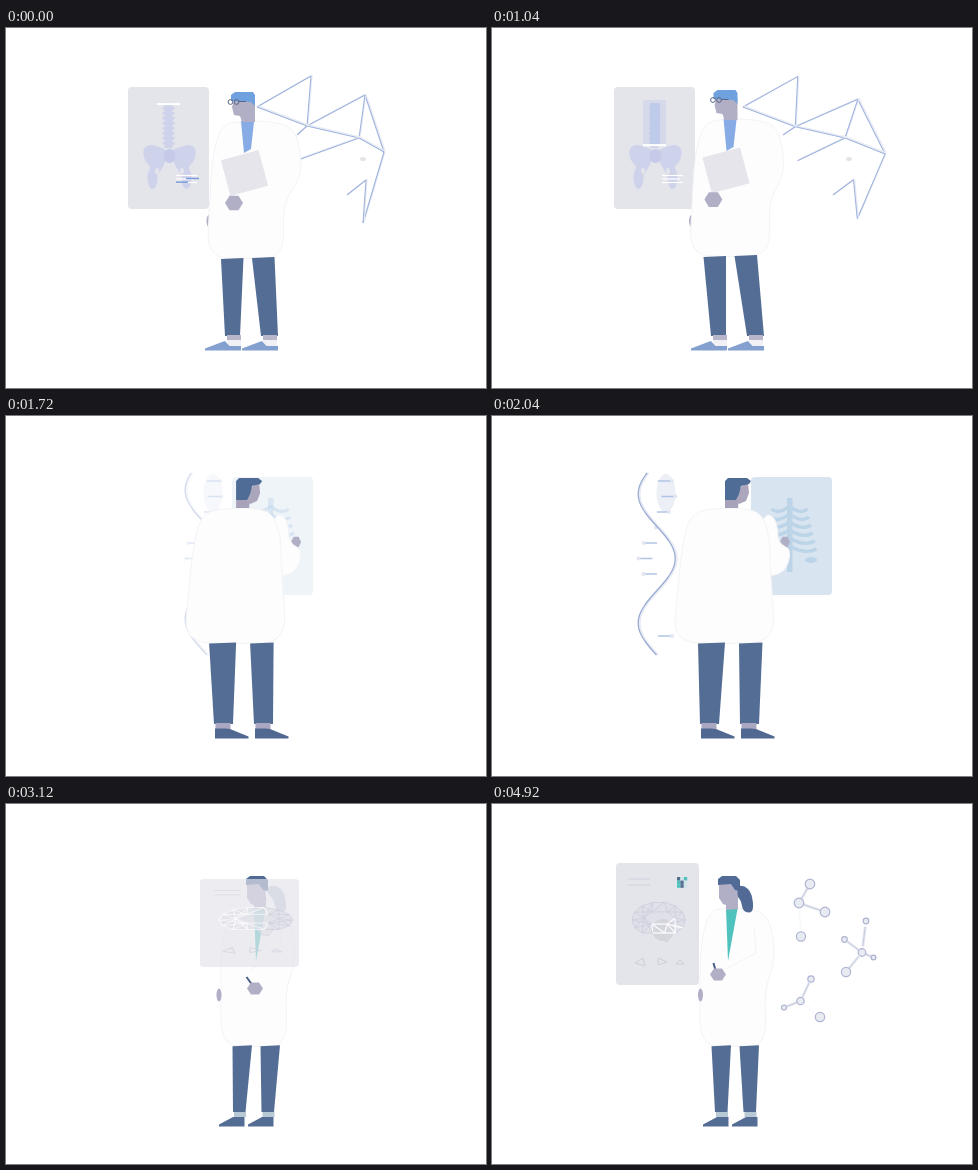
Animation of 480 by 360 pixels, one loop 5000 ms. Source, as an HTML page with a canvas:

```html
<!DOCTYPE html>
<html lang="en">
<head>
<meta charset="utf-8">
<title>Medical research</title>
<style>
html, body { margin: 0; width: 100%; height: 100%; overflow: hidden; background: #fff; }
canvas { display: block; }
</style>
</head>
<body>
<canvas id="stage" width="480" height="360"></canvas>
<script>
const ctx = document.getElementById('stage').getContext('2d');
const LOOP = 5000, TURN = Math.PI * 2;
const NAVY = '#536d95', SKIN = '#b1afc6', COAT = '#fdfdfe', EDGE = '#f4f4f7', TEAL = '#4fc2bd';
const BOARD = '#e4e4eb', SHOE_TEAL = '#5eb4bd';

const ramp = (t, a, b) => Math.max(0, Math.min(1, (t - a) / (b - a)));
const smooth = k => k * k * (3 - 2 * k);
const ease = (t, a, b) => smooth(ramp(t, a, b));
const lerp = (a, b, k) => a + (b - a) * k;
const mix = (p, q, k) => [lerp(p[0], q[0], k), lerp(p[1], q[1], k)];
const distance = (p, q) => Math.hypot(p[0] - q[0], p[1] - q[1]);

// Points spread evenly around an ellipse.
const ring = (n, x, y, rx, ry) => Array.from({ length: n }, (_, i) =>
  [x + rx * Math.cos(i / n * TURN), y + ry * Math.sin(i / n * TURN)]);

/* ---------- drawing helpers ---------- */

function paint(fill, stroke, width = 1) {
  if (fill) { ctx.fillStyle = fill; ctx.fill(); }
  if (stroke) { ctx.strokeStyle = stroke; ctx.lineWidth = width; ctx.stroke(); }
}

function poly(p, fill, stroke, width) {
  ctx.beginPath();
  for (let i = 0; i < p.length; i += 2) ctx.lineTo(p[i], p[i + 1]);
  ctx.closePath();
  paint(fill, stroke, width);
}

// Closed curve through the midpoints of the given corners.
function blob(p, fill, stroke, width) {
  const n = p.length;
  const mid = i => [(p[i % n] + p[(i + 2) % n]) / 2, (p[(i + 1) % n] + p[(i + 3) % n]) / 2];
  ctx.beginPath();
  ctx.moveTo(...mid(n - 2));
  for (let i = 0; i < n; i += 2) ctx.quadraticCurveTo(p[i], p[i + 1], ...mid(i));
  ctx.closePath();
  paint(fill, stroke, width);
}

function line(x1, y1, x2, y2, color, width) {
  ctx.beginPath();
  ctx.moveTo(x1, y1);
  ctx.lineTo(x2, y2);
  paint(null, color, width);
}

function oval(x, y, rx, ry, fill, stroke, width) {
  ctx.beginPath();
  ctx.ellipse(x, y, rx, ry, 0, 0, TURN);
  paint(fill, stroke, width);
}

function box(x, y, w, h, color) {
  ctx.fillStyle = color;
  ctx.fillRect(x, y, w, h);
}

function layer(alpha, dx, dy, draw) {
  if (alpha <= 0) return;
  ctx.save();
  ctx.globalAlpha *= alpha;
  ctx.translate(dx, dy);
  draw();
  ctx.restore();
}

// Places a board designed at `home` into the rectangle `r`.
function board(r, home, color, alpha, content) {
  layer(alpha, r[0], r[1], () => {
    ctx.scale(r[2] / home[2], r[3] / home[3]);
    ctx.translate(-home[0], -home[1]);
    ctx.beginPath();
    ctx.roundRect(...home, 4);
    paint(color);
    content();
  });
}

/* ---------- body parts ---------- */

function coat(neck, elbows, hem, top, bottom) {
  const [l, r] = elbows;
  blob([neck[0], top, l + 9, top + 3, l, top + 38, (l + hem[0]) / 2, top + 85, hem[0], bottom - 1,
        (hem[0] + hem[1]) / 2, bottom + 1, hem[1], bottom - 1, hem[1] - 3, top + 82,
        r, top + 58, r, top + 30, r - 8, top + 5, neck[1], top], COAT, EDGE);
}

function leg(topX, topY, topW, x, w) {
  poly([topX, topY + .5, topX + topW, topY - .5, x + w, 308, x, 308], NAVY);
}

// A negative width points the toe to the right.
function shoe(toe, w, heelY, color) {
  poly([toe, 320.5, toe + w * .55, 313, toe + w * .68, heelY, toe + w, heelY, toe + w, 322.5, toe, 322.5], color);
}

function hand(x, y, rx, ry) {
  poly(ring(6, x, y, rx, ry).flat(), SKIN);
}

/* ---------- first scene: pelvis board and wire shape ---------- */

const PELVIS_BOARD = [122, 59, 81, 122];

function pelvis(t) {
  const bone = '#ced2eb', scan = 76 + 44 * (1 - Math.pow(1 - ramp(t, 0, 1500), 2.3));
  box(151, 72, 23, (scan - 72) * ramp(t, 0, 200), '#d6d9ea');
  box(158.5, 77, 8, 43, bone);
  for (let y = 79; y < 119; y += 5) box(156.5, y, 12, 2.5, bone);
  box(158, 75, 10, scan - 75, '#bfcbea');
  for (const side of [-1, 1]) {
    layer(1, 163.5, 0, () => {
      ctx.scale(side, 1);
      blob([1, 123, 10, 119, 20, 116, 27, 121, 25, 133, 18, 139, 22, 148, 14, 150, 5, 137], bone);
      oval(17, 150, 5, 11, bone);
      oval(12.5, 143, 2, 3, BOARD);
    });
  }
  oval(163.5, 128, 6, 7, '#c4cae8');
  line(151, scan, 174, scan, '#fff', 2);
  for (let i = 0; i < 3; i++) line(170, 147.5 + i * 3.5, 191 - i % 2 * 3, 147.5 + i * 3.5, '#fff', 1.2);
  layer(1 - ramp(t, 100, 400), 0, 0, () => {
    line(180, 150.5, 193, 150.5, '#7499d5', 1.4);
    line(170, 154.2, 182, 154.2, '#7499d5', 1.4);
  });
}

// Node position and how strongly it is pulled to the right.
const NODES = {
  a: [251, 79, 0], b: [305, 48, .05], c: [301, 98, .15], d: [359, 67, .45], e: [378, 124, 1], f: [353, 110, 0],
  g: [357, 195, .55], h: [360, 152, .1], i: [341, 167, 0], j: [291, 107, 0], k: [292, 132, .9]
};
const EDGES = 'ab bc ac cd de df cf fe fk eg hg hi cj'.split(' ');

function mesh(t) {
  const pull = t * .0145 + 51 * ramp(t, 1150, 1660) ** 2;
  const at = name => {
    const [x, y, reach] = NODES[name];
    return [x + pull * reach, y + (138 - y) * reach * pull * .009];
  };
  layer(ramp(t, 1150, 1400), 0, 0, () => poly([...at('a'), ...at('b'), ...at('c')], '#eeeeef'));
  for (const [from, to] of EDGES) {
    const p = at(from), q = at(to);
    line(p[0] + 1, p[1] - 1, q[0] + 1, q[1] - 1, '#eaecf4', 1.4);
    line(...p, ...q, '#9fb3de', 1.1);
  }
  oval(357, 131, 3, 2, '#e4e4e7');
  layer(ramp(t, 1100, 1400), 0, 0, () => {
    oval(379, 138.5, 7, 3, '#e5e5e9');
    line(315, 53, 334, 62, '#ebebef', 2);
  });
}

function man(t) {
  const lean = ease(t, 0, 600), turn = ease(t, 1150, 1440);
  const dx = -3.5 * lean, dy = -2 * lean;

  oval(203 + dx, 193, 2.5, 6, SKIN);
  const elbow = dx - 12 * turn;
  coat([237 + elbow / 2, 259 + elbow / 2], [206 + elbow, 295 + elbow], [201 + dx, 279 + 3 * turn], 93 + dy, 230 + dy);

  [[215, 219, 15, 5, 4], [246, 255, 17, -3, -6]].forEach(([top, bottom, w, hipTurn, footTurn], i) => {
    const ankle = bottom + footTurn * turn, hip = top + dx + hipTurn * turn;
    leg(hip, 230.5 + dy * (1 - turn) - i, 22.5, ankle, w);
    layer(turn, 0, 0, () => line(ankle - 1, 290 - 2 * i, ankle + w, 288 - 4 * i, '#aeb2c9', 3));
    box(ankle + 2, 307, 14, 5, '#b8b6ca');
    box(ankle + 2, 312, 14, 7, '#f0f0f5');
    const toe = 199 + 37 * i + (8 - 11 * i) * turn;
    shoe(toe, 36 - 4 * turn, 318, '#83a0cf');
    layer(turn, 0, 0, () => shoe(toe, 36 - 4 * turn, 318, SHOE_TEAL));
  });

  const blue = turn > .5 ? '#78addb' : '#86abe5';
  layer(1, dx - 3 * turn, dy, () => poly([235, 93, 248, 94, 245, 121, 238, 125], blue));
  layer(1, 238.5 + dx * 1.3 - 10 * turn, 145 + dy * 1.3 - turn, () => {
    ctx.rotate(lerp(-.26, .06, turn));
    box(-19.5, -18.5, 39 + 2 * turn, 37, '#e6e5eb');
  });
  hand(228 + dx * 1.9 - 6 * turn, 175 + dy * 1.7 - 10 * turn, 9 + 6 * turn, 8.5 - 2 * turn);
  layer(1, dx - 1.5 * turn, dy, () => {
    poly([228, 73, 249, 72, 249, 94, 236, 94, 234, 88, 228, 87, 226, 79], SKIN);
    poly([225, 73, 225, 67, 229, 64, 247, 64, 249, 67, 249, 78, 245, 74], turn > .5 ? '#70a5da' : '#6fa1df');
    for (const x of [224.5, 230.5]) oval(x, 74, 2.4, 2.4, null, '#5b6785');
    line(233, 73.5, 240, 73.5, '#5b6785');
  });
}

function pelvisScene(t) {
  const alpha = 1 - ramp(t, 1560, 1680), turn = ease(t, 1150, 1440);
  const slide = 36 * ramp(t, 1150, 1660) ** 3;
  board([122 - slide, 59 + 2 * turn, 81, 122 - 4 * turn], PELVIS_BOARD, BOARD, alpha, () => pelvis(t));
  layer(alpha, 0, 0, () => mesh(t));
  man(t);
}

/* ---------- second scene: ribs and double helix ---------- */

const RIB_BOARD = [259, 61, 81, 118];

function ribs() {
  const bone = '#bcd4e8';
  box(295, 82, 5.5, 74, bone);
  for (let i = 0; i < 6; i++) {
    const y = 90 + i * 8, w = 18 + i * 1.8;
    for (const side of [-1, 1]) {
      ctx.beginPath();
      ctx.moveTo(297.5, y);
      ctx.quadraticCurveTo(297.5 + side * w * .6, y + 9, 297.5 + side * w, y + 3);
      paint(null, bone, 3.4);
    }
  }
  oval(319, 144, 6, 3, bone);
}

function helix(t) {
  const phase = (t - 2040) * .0006;
  const swing = y => 18.5 * Math.cos((y - 78) / 129 * TURN - phase);
  oval(174, 77, 9.5, 19, '#eceff5');
  for (let y = 65; y < 230; y += 15.5) {
    if (y > 165 && y < 215) continue;
    const s = swing(y), x = 165 + s;
    line(x, y, x - Math.sign(s) * Math.min(14, Math.abs(s)), y, '#b0c4e4', 1.5);
    oval(x, y, 2, 2, '#e2e6f1');
  }
  for (const [shift, color, width] of [[1.5, '#e8ebf3', 2], [0, '#9aabd4', 1.3]]) {
    ctx.beginPath();
    for (let y = 57; y <= 240; y += 2) ctx.lineTo(164.7 - swing(y) + shift, y);
    paint(null, color, width);
  }
}

function ribScene(t) {
  const settle = ramp(t, 1680, 2040), leave = ramp(t, 2800, 3000) ** 2;
  const shift = -60 * Math.cos(settle * 7) * (1 - settle) ** 2 + 47 * leave;
  const alpha = ramp(t, 1680, 1780) * (1 - ramp(t, 2900, 3000));
  board([RIB_BOARD[0] + shift, ...RIB_BOARD.slice(1)], RIB_BOARD, '#d8e4f0', alpha, ribs);
  layer(alpha, -shift, 0, () => helix(t));

  const sway = 7 * leave - 3 * (1 - smooth(settle));
  layer(1, sway, 0, () => {
    hand(293, 126, 5, 6);
    blob([274, 96, 285, 104, 286, 128, 300, 133, 293, 158, 268, 161, 264, 120], COAT, EDGE);
    coat([233, 250], [190, 278], [181, 283], 92, 227);
    poly([233, 80, 247, 80, 246, 92, 233, 92], '#a7a2b9');
    poly([244, 76, 250, 70, 256, 67, 257, 77, 254, 85, 247, 88, 243, 84], '#aba6bc');
    poly([233, 84, 233, 65, 236, 62, 255, 62, 259, 65, 257, 68, 249, 70, 247, 78, 244, 84], '#4f6c97');
  });
  for (const [hip, w, ankle] of [[206, 27, 208], [247, 23.5, 248]]) {
    leg(hip + sway, 227, w, ankle, 19);
    box(ankle + 1.5, 307, 15, 6, '#aaa8c1');
    shoe(ankle + 34.5, -33.5, 312.5, '#516891');
  }
}

/* ---------- third scene: brain board and molecules ---------- */

const BRAIN_BOARD = [124, 59, 83, 122];
const RIM = ring(14, 171, 116, 31, 18).map(([x, y]) => [x, Math.min(y, 129)]);
const CORE = ring(6, 172, 114, 18, 7);
const next = (list, i) => list[(i + 1) % list.length];
const BRAIN_EDGES = [
  ...RIM.map((p, i) => [p, next(RIM, i)]),
  ...RIM.flatMap(p => [...CORE].sort((a, b) => distance(a, p) - distance(b, p)).slice(0, 2).map(q => [p, q])),
  ...CORE.map((p, i) => [p, next(CORE, i)])
];

function brain(t) {
  const arrive = ease(t, 3120, 3500), spin = ease(t, 3800, 4920);
  const glow = [160 + 31 * arrive - 15 * spin, 113 + 4 * arrive + 9 * spin];
  const reach = 24 - 9 * arrive;
  layer(1, 140 * .14 * spin, 0, () => {
    ctx.scale(1 - .14 * spin, 1);
    poly([171, 128, 186, 128, 181, 138, 176, 136], '#e0e0e8', '#cbcbdc', .8);
    poly(RIM.flat(), '#e0e0e8');
    layer(spin, 0, 0, () => oval(...glow, 13, 11, '#d5d5de'));
    for (const [p, q] of BRAIN_EDGES) {
      const lit = distance(mix(p, q, .5), glow) < reach;
      line(...p, ...q, lit ? '#fff' : '#cbcbdc', lit ? 1.2 : .8);
    }
  });
}

function brainBoard(t) {
  for (const y of [75, 81]) line(136, y, 158, y, '#cfd1de');
  const step = Math.floor(t / 400) % 2, tones = ['#55708f', TEAL, '#d2e6ea'];
  layer(ramp(t, 3200, 3360), 0, 0, () => {
    for (let i = 0; i < 9; i++) {
      const col = i % 3, row = (i - col) / 3;
      box(185 + col * 3.4, 73 + row * 3.6, 3.4, 3.6, tones[(col * 2 + row * row + step * row) % 3]);
    }
  });
  brain(t);
  poly([143, 159, 151, 154, 153, 162], null, '#ccceda');
  poly([166, 154, 175, 158, 166, 161], null, '#ccceda');
  poly([184, 160, 188, 156, 192, 160], null, '#ccceda');
}

// Centre atom, then its neighbours as x, y, radius.
const MOLECULES = [
  [[307, 99, 4.8], [318, 80, 4.8], [333, 108, 4.8], [309, 132.5, 4.6]],
  [[370, 148.5, 3.8], [374, 117, 2.8], [352.5, 135.5, 2.8], [381.5, 153.5, 2.4], [354, 168, 4.6]],
  [[308.5, 197, 3.7], [319, 175, 3.2], [292, 203.5, 2.5], [328, 213, 4.7]]
];

function molecules(t) {
  const atom = (x, y, r) => oval(x, y, r, r, '#e9ebf2', '#adb4d1', 1.2);
  const fade = 1 - ramp(t, 4100, 4700);
  for (const group of MOLECULES) {
    const [centre, ...others] = group;
    others.forEach((p, i) => {
      const loose = group.length === 4 && i === 2;
      layer(loose ? .1 + .9 * fade : 1, 0, 0, () => {
        const bond = [...mix(centre, p, .2), ...mix(centre, p, .82)];
        line(...bond, '#e8eaf2', 3);
        line(...bond, '#c6cbde', 1);
      });
    });
    group.forEach(p => atom(...p));
  }
  layer(fade, 0, 0, () => atom(290, 86.5, 4.5));
}

function woman(t) {
  const arrive = 1 - ease(t, 3120, 3400);
  const lean = arrive - ease(t, 3800, 4920);
  const dx = 7 * lean, dy = -3 * Math.abs(lean);

  layer(1, dx * .85, dy, () => {
    const centre = -5 * arrive;
    coat([240 + centre, 256 + centre], [214 + centre, 288 + centre], [214 + centre, 281 + centre], 107, 245);
    line(268, 126, 270, 152, EDGE);
    line(270, 152, 239, 168, EDGE);
  });
  oval(215.5 - 2.5 * arrive + Math.min(dx, 0), 194 + dy, 2.5, 6.5, SKIN);
  for (const [hip, ankle, toe] of [[223, 225, 211], [251, 253.5, 240]]) {
    const x = ankle + 2 * lean;
    leg(hip + 3.5 * lean, 244.5 + dy * .9, 19.5, x, 12.5);
    box(x + 1, 308, 12, 5, '#b6c9d4');
    shoe(toe + 2 * arrive, 25.5, 313, NAVY);
  }
  layer(1, dx, dy, () => {
    poly([241, 107, 252.5, 108, 243, 160], TEAL);
    layer(ramp(t, 3000, 3400), 5 * arrive, 0, () =>
      blob([248, 86, 259, 84, 267, 92, 269, 112, 258, 111, 256, 99, 250, 93], '#526b96'));
    poly([241, 98, 253, 96, 253, 108, 241, 109], SKIN);
    poly([234, 82, 252, 82, 253, 100, 247, 106, 238, 103, 234, 97], SKIN);
    poly([233, 84, 233, 78, 237, 75, 251, 75, 255, 79, 255, 90, 250, 89, 246, 83], '#526b96');
  });
  layer(1, dx + 9 * arrive, dy + 14 * arrive, () => {
    line(228.5 - 4 * arrive, 162, 231, 171, '#4b5e87', 2);
    hand(233, 173.5, 8, 7);
  });
}

function brainScene(t) {
  const pop = ease(t, 3000, 3120), spread = ease(t, 3120, 3360);
  const start = [222 - 28 * pop, 88 - 13 * pop, 56 + 43 * pop, 60 + 28 * pop];
  const r = start.map((v, i) => lerp(v, BRAIN_BOARD[i], spread));
  const front = t < 3220;
  const show = () => board(r, BRAIN_BOARD, BOARD, front ? .68 * pop : 1, () => brainBoard(t));
  if (!front) show();
  const grow = ease(t, 3180, 3360);
  layer(grow, -70 * (1 - grow), 0, () => molecules(t));
  woman(t);
  if (front) show();
}

function render(t) {
  box(0, 0, 480, 360, '#fff');
  if (t < 1680) pelvisScene(t);
  else if (t < 3000) ribScene(t);
  else brainScene(t);
}

ctx.lineJoin = 'round';
const began = performance.now();
function tick() {
  render((performance.now() - began) % LOOP);
  requestAnimationFrame(tick);
}
tick();
</script>
</body>
</html>
```
